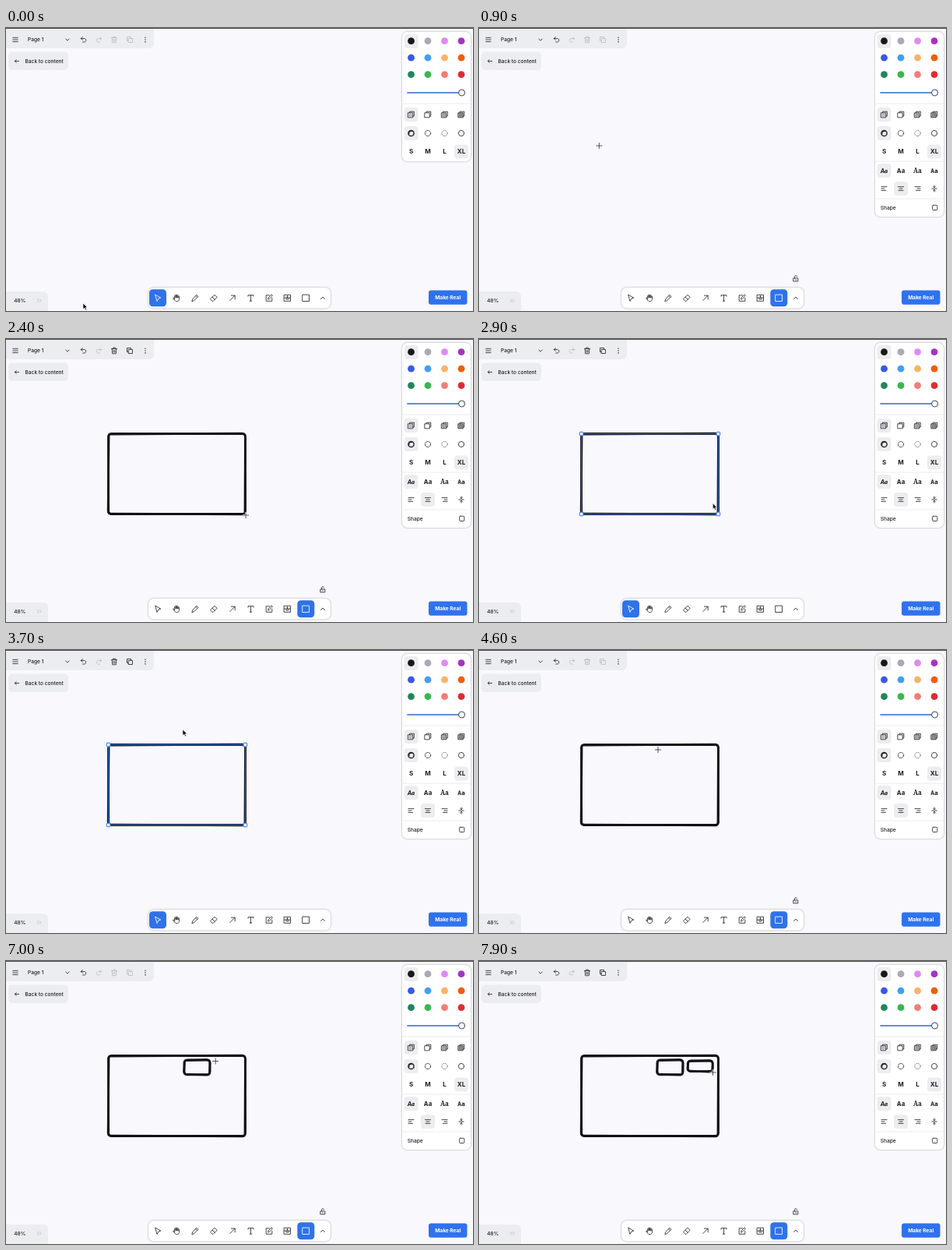
Animation of 600x363 px, one loop 8000 ms. Source, as an HTML page:

```html
<!DOCTYPE html>
<html lang="en">
<head>
<meta charset="utf-8">
<title>Whiteboard</title>
<style>
  html, body { margin: 0; width: 100%; height: 100%; overflow: hidden; background: #f9f8fd; }
  svg { display: block; width: 100vw; height: 100vh; }
  text { font: 500 6.6px Inter, sans-serif; fill: #1d1d22; }
  .icon { fill: none; stroke: #26262b; stroke-width: .85; stroke-linecap: round; stroke-linejoin: round; }
  .dim { stroke: #bcbdc5; }
  .on { stroke: #fff; }
  .side { fill: #ecedf1; }
  .card { fill: #fff; filter: drop-shadow(0 .5px 1.2px rgba(0, 0, 0, .35)); }
  .pick { fill: #ededf0; }
  .rule { stroke: #e8e8ec; stroke-width: .8; }
  .ink path { fill: none; stroke: #111115; stroke-width: 2.7; stroke-linejoin: round; }
  .sel rect { fill: #fff; stroke: #2f72e4; stroke-width: 1; }
  .sel .edge { fill: none; }
</style>
</head>
<body>
<svg id="stage" viewBox="0 0 600 363" preserveAspectRatio="none"></svg>
<script>
const LOOP = 8000, STEP = 100;
const stage = document.getElementById('stage');

function add(tag, attrs, parent = stage) {
  const el = document.createElementNS('http://www.w3.org/2000/svg', tag);
  for (const k in attrs) el.setAttribute(k, attrs[k]);
  return parent.appendChild(el);
}
const group = (cls = '', parent = stage) => add('g', { class: cls }, parent);
const box = (x, y, width, height, rx, cls, parent) =>
  add('rect', { x, y, width, height, rx, class: cls }, parent);
const icon = (x, y, d, cls = '', parent) =>
  add('path', { d, transform: `translate(${x} ${y})`, class: 'icon ' + cls }, parent);
const rule = (y, parent) => add('path', { d: `M509 ${y}H597`, class: 'rule' }, parent);
function label(x, y, str, style = '', parent) {
  add('text', { x, y, style }, parent).textContent = str;
}
const show = (el, on) => el.setAttribute('visibility', on ? 'visible' : 'hidden');

// Canvas layer
const inks = [0, 1, 2].map(() => {
  const g = group('ink');
  return [add('path', {}, g), add('path', {}, g)];
});
const sel = group('sel');
const edge = box(0, 0, 1, 1, 0, 'edge', sel);
const handles = [0, 1, 2, 3].map(() => box(0, 0, 4.6, 4.6, .6, '', sel));

// Top and bottom left
box(-8, -8, 198, 34, 6, 'side');
box(3, 30.5, 77, 23.5, 5, 'side');
box(-8, 338, 62, 33, 6, 'side');
box(0, 0, 600, 1, 0, '').setAttribute('fill', '#47474c');
icon(12, 15, 'M-3.2 -2.6H3.2M-3.2 0H3.2M-3.2 2.6H3.2');
label(28, 17.3, 'Page 1');
icon(79, 15, 'M-2.2 -1L0 1.2L2.2 -1');
icon(99.5, 15, 'M-1.2 -3.5L-3.2 -1.5L-1.2 .5M-3.2 -1.5H1C4 -1.5 4 3 1 3H-.8');
icon(119.5, 15, 'M1.2 -3.5L3.2 -1.5L1.2 .5M3.2 -1.5H-1C-4 -1.5 -4 3 -1 3H.8', 'dim');
const edits = [
  icon(139, 15, 'M-3.6 -2.4H3.6M-1.4 -2.4V-3.8H1.4V-2.4M-2.8 -2.4L-2.3 3.8H2.3L2.8 -2.4M-.8 -.5V2M.8 -.5V2'),
  icon(159, 15, 'M-1.5 -1.5H3.5V3.5H-1.5ZM-1.5 1.5H-3.5V-3.5H1.5V-1.5')
];
icon(179, 15, 'M0 -2.8V-2.7M0 0V.1M0 2.8V2.9').style.strokeWidth = 1.4;
icon(14, 42.5, 'M2.6 0H-2.6M-.8 -1.9L-2.6 0L-.8 1.9');
label(24.5, 44.9, 'Back to content');
label(10.3, 351.8, '48%');
icon(42.5, 349.5, 'M-2.4 -2L-.4 0L-2.4 2M.6 -2L2.6 0L.6 2', 'dim');

// Toolbar
box(183, 333, 234, 26.5, 7, 'card');
const active = box(0, 335.3, 22, 22, 4.5, '');
active.setAttribute('fill', '#2f72ea');
const tools = [
  [195, 'M-3 -4L3.8 -.2L.8 .8L-.8 3.8Z'],
  [219, 'M-2.3 1V-2.5C-2.3 -3.6 -1 -3.6 -1 -2.5V-.3V-3.5C-1 -4.6 .5 -4.6 .5 -3.5V-.3V-3C.5 -4.1 2 -4.1 2 -3V0V-1.8C2 -2.9 3.6 -2.9 3.6 -1.8V1C3.6 5 -.8 5 -2 3.2L-4.2 .4C-4.6 -.5 -3.4 -1 -2.3 1'],
  [243, 'M-4 4L-3.3 1.3L2 -4L4 -2L-1.3 3.3ZM.8 -2.8L2.8 -.8'],
  [267, 'M-4.2 1L1 -4L4.2 -1L-.8 4H-1.8ZM-2 -1.2L1.4 2'],
  [291, 'M-3.2 3.2L3.2 -3.2M-1.6 -3.2H3.2V1.6'],
  [314.5, 'M-3.5 -2.2V-3.6H3.5V-2.2M0 -3.6V3.8M-1.3 3.8H1.3'],
  [338, 'M.5 -3.5H-3.8V4H3.8V0M-1.3 1.4L-.9 -.4L3.2 -4.4L4.4 -3.1L.4 1Z'],
  [361.5, 'M-4 -4H4V4H-4ZM-4 -.2H-1.5V1.6H1.5V-.2H4M0 -2.8V-.3M-1.2 -1.3L0 -.2L1.2 -1.3'],
  [385.3, 'M-4.2 -4.2H4.2V4.2H-4.2Z']
].map(([x, d]) => icon(x, 346.3, d));
icon(407, 346.3, 'M-2.5 1.2L0 -1.2L2.5 1.2');
const lock = icon(407, 321.5, 'M-2.8 -.6H2.8V3.4H-2.8ZM-1.5 -.6V-2.4C-1.5 -4.3 1.5 -4.3 1.5 -2.6M0 1V1.7');
box(543, 336.5, 49.5, 18.3, 3, '').setAttribute('fill', '#2f72ee');
label(567.7, 348.2, 'Make Real', 'fill:#fff;font-weight:700;text-anchor:middle');

// Style panel
const cols = [520.5, 542, 563.5, 585];
const pick = (col, y, parent) => box(cols[col] - 9, y - 9, 18, 18, 4, 'pick', parent);
const mid = 'text-anchor:middle;';
const card = box(509, 5, 88, 166, 6.5, 'card');
pick(0, 17);
pick(0, 111);
pick(0, 135);
pick(3, 158.5);
const paints = ['#18181b', '#a8aab7', '#df8af4', '#a732c2', '#3759e6', '#439ff2',
  '#fbb368', '#f15d09', '#1f8758', '#37b84e', '#f67c78', '#df2b30'];
paints.forEach((fill, i) =>
  add('circle', { cx: cols[i % 4], cy: 16.7 + 21.5 * Math.floor(i / 4), r: 4.4, fill }));
add('path', { d: 'M516 83H585', stroke: '#2e69c9', 'stroke-width': 1.7, 'stroke-linecap': 'round' });
add('circle', { cx: 585.5, cy: 83, r: 4, fill: '#fff', stroke: '#34425c', 'stroke-width': 1 });
rule(97);

const fills = ['none', '#fff', '#c9cad0', '#a5a6ad'];
const dashes = ['none', '1.8 1.2', '.2 1.75', 'none'];
cols.forEach((x, i) => {
  icon(x, 111, 'M-2 -2.2V-3.8H3.8V2H2.2');
  icon(x, 111, 'M-3.8 -2.2H2.2V3.8H-3.8Z').style.fill = fills[i];
  if (i !== 1) icon(x, 111, 'M-2 -.3H.4V2H-2Z').style.strokeWidth = .4;
  const ring = icon(x, 135, 'M3.6 0A3.6 3.6 0 1 1 -3.6 0A3.6 3.6 0 1 1 3.6 0');
  ring.style.strokeDasharray = dashes[i];
  if (!i) {
    ring.style.strokeWidth = 1.5;
    icon(x, 135, 'M-2.6 .8A2.8 2.8 0 0 1 1.5 -2.5').style.strokeWidth = 1.3;
  }
  label(x, 161.3, ['S', 'M', 'L', 'XL'][i], mid + 'font-size:8px;font-weight:700');
});

const extra = group();
rule(171, extra);
pick(0, 183, extra);
pick(1, 206, extra);
const faces = ['italic 900 7.6px Lato,sans-serif', '700 7.8px Inter,sans-serif',
  '600 8px "Noto Serif",serif', '700 7.8px "DejaVu Sans Mono",monospace'];
const aligns = ['M-3.5 -2.4H3.5M-3.5 0H.5M-3.5 2.4H2', 'M-3.5 -2.4H3.5M-2 0H2M-3 2.4H3',
  'M-3.5 -2.4H3.5M-.5 0H3.5M-2 2.4H3.5', 'M-3.2 0H3.2M0 -4V-1.5M-1.3 -2.6L0 -1.4L1.3 -2.6M0 4V1.5M-1.3 2.6L0 1.4L1.3 2.6'];
cols.forEach((x, i) => {
  label(x, 185.8, 'Aa', `${mid}font:${faces[i]}`, extra);
  icon(x, 206, aligns[i], '', extra);
});
rule(219, extra);
label(515.8, 232.6, 'Shape', '', extra);
box(582.6, 227.3, 6.2, 6.2, 1, 'icon', extra);

// Pointers
const arrow = add('path', { d: 'M0 0V7.6L1.8 6L3.1 8.8L4.5 8.2L3.2 5.5H5.6Z', fill: '#0c0c0e', stroke: '#fff', 'stroke-width': .6 });
const cross = group();
for (const [stroke, w] of [['#fff', 2.2], ['#3d3d42', .9]])
  add('path', { d: 'M-4 0H4M0 -4V4', stroke, 'stroke-width': w }, cross);

// Motion: [time, x, y]
const pointer = [
  [0, 99, 353], [100, 118, 332], [200, 146, 280], [300, 165, 215], [400, 172, 182], [500, 172, 182],
  [600, 172, 176], [700, 172, 176], [800, 166, 166], [1100, 131, 121], [1200, 131, 121], [1300, 160, 150],
  [1500, 245, 218], [1600, 263, 228], [1800, 282, 227], [2400, 308, 226], [2800, 308, 226], [3100, 285, 180],
  [3500, 231, 106], [3700, 227, 102], [4100, 227, 102], [4400, 229, 122], [4600, 230, 128], [4800, 229, 127],
  [5200, 263, 147], [5500, 265, 147], [5900, 291, 137], [6400, 291, 137], [6900, 270, 129], [7300, 267, 127],
  [7400, 267, 127], [7900, 300.5, 143]
];
const shapes = [
  { x: 131.6, y: 121.6, drag: [[1200, 132, 122], [1300, 148, 138], [1500, 225, 205], [1600, 253.8, 224.5], [1700, 266, 224.5], [2300, 307.4, 224.5]] },
  { x: 229, y: 127, drag: [[4800, 230, 128], [5200, 262, 145.8]] },
  { x: 268.3, y: 128, drag: [[7400, 269, 129], [7900, 300.2, 141.6]] }
];

function at(keys, t) {
  const i = keys.findIndex(k => k[0] > t);
  if (i < 0) return keys[keys.length - 1].slice(1);
  if (!i) return keys[0].slice(1);
  const a = keys[i - 1], b = keys[i], f = (t - a[0]) / (b[0] - a[0]);
  return [a[1] + (b[1] - a[1]) * f, a[2] + (b[2] - a[2]) * f];
}

// Rounded box with slightly uneven sides, like a marker
function sketch(x, y, x2, y2, j) {
  const r = Math.min(4, (x2 - x) / 2, (y2 - y) / 2);
  return `M${x + r} ${y + j}L${x2 - r} ${y - j}Q${x2 + j} ${y} ${x2} ${y + r}` +
    `L${x2 - j} ${y2 - r}Q${x2} ${y2 + j} ${x2 - r} ${y2 + j}` +
    `L${x + r} ${y2 - j}Q${x - j} ${y2} ${x - j} ${y2 - r}L${x + j} ${y + r}Q${x} ${y} ${x + r} ${y + j}Z`;
}

const during = (t, spans) => spans.some(([a, b]) => t >= a && t < b);

function render(time) {
  const t = Math.floor(time % LOOP / STEP) * STEP;
  const drawing = during(t, [[300, 2700], [4200, 5400], [6700, LOOP]]);
  const picked = during(t, [[2700, 3900]]) ? 0 : during(t, [[5400, 6400]]) ? 1 : -1;
  const editable = during(t, [[1200, 3900], [4800, 6400], [7400, LOOP]]);
  const long = drawing || picked >= 0;

  shapes.forEach((s, i) => {
    const [x2, y2] = at(s.drag, t), on = t >= s.drag[0][0];
    inks[i].forEach((p, n) => {
      p.setAttribute('d', sketch(s.x, s.y, x2, y2, n ? -.15 : .45));
      show(p, on);
    });
    if (i !== picked) return;
    const w = x2 - s.x, h = y2 - s.y;
    for (const [k, v] of Object.entries({ x: s.x, y: s.y, width: w, height: h })) edge.setAttribute(k, v);
    handles.forEach((el, n) => {
      el.setAttribute('x', s.x + (n % 2) * w - 2.3);
      el.setAttribute('y', s.y + (n >> 1) * h - 2.3);
    });
  });
  show(sel, picked >= 0);

  edits.forEach(el => el.classList.toggle('dim', !editable));
  const tool = drawing ? 8 : 0;
  tools.forEach((el, i) => el.classList.toggle('on', i === tool));
  active.setAttribute('x', drawing ? 374.3 : 184);
  show(lock, drawing);
  show(extra, long);
  card.setAttribute('height', long ? 237 : 166);

  const [x, y] = at(pointer, t);
  for (const el of [arrow, cross]) el.setAttribute('transform', `translate(${x} ${y})`);
  show(arrow, !drawing);
  show(cross, drawing);
}

const start = performance.now();
function tick() {
  render(performance.now() - start);
  requestAnimationFrame(tick);
}
tick();
</script>
</body>
</html>
```
